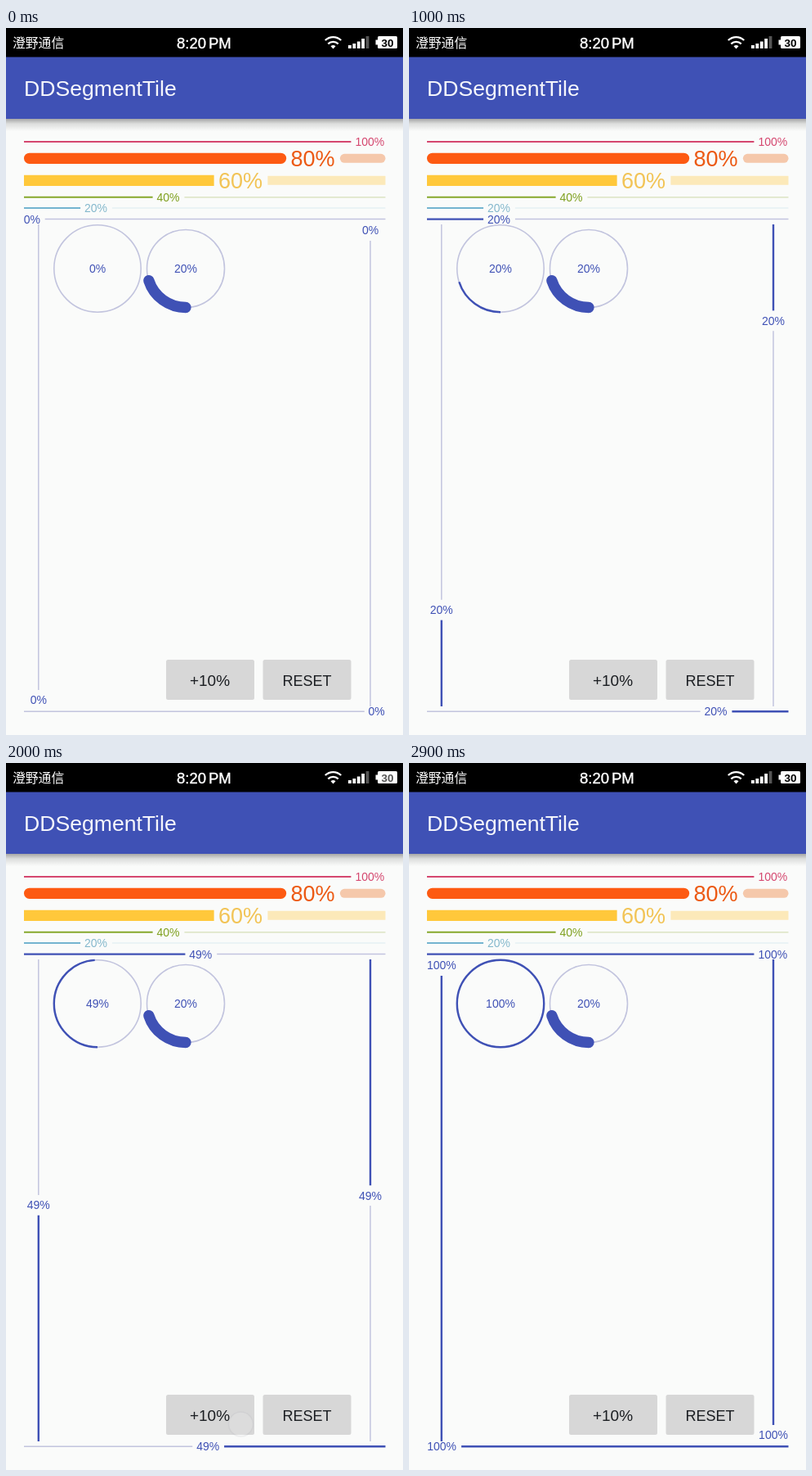
An HTML page for the animation above (3.9 s loop, 486x864 px).

```html
<!DOCTYPE html>
<html>
<head>
<meta charset="utf-8">
<style>
  html, body { margin: 0; width: 100%; height: 100%; overflow: hidden; background: #fafbfa; }
  svg { display: block; width: 486px; height: 864px; font-family: "Liberation Sans", Arial, sans-serif; }
  .arc { fill: none; }
</style>
</head>
<body>
<svg viewBox="0 0 486 864">
  <defs>
    <linearGradient id="shade" x2="0" y2="1">
      <stop offset="0" stop-opacity=".34"/>
      <stop offset=".4" stop-opacity=".12"/>
      <stop offset="1" stop-opacity="0"/>
    </linearGradient>
  </defs>
  <rect width="486" height="864" fill="#fafbfa"/>
  <rect y="111" width="486" height="15" fill="url(#shade)"/>
  <rect y="35" width="486" height="76" fill="#3f51b5"/>
  <rect width="486" height="35.5"/>
  <text x="22" y="83" font-size="26.6" fill="#f6f7fc">DDSegmentTile</text>
  <g fill="#fff">
    <text x="8" y="23.5" font-size="15.8" font-weight="500" style="font-family:'Noto Sans CJK SC','Noto Sans CJK',sans-serif">澄野通信</text>
    <g font-size="18.5" stroke="#fff" stroke-width=".4">
      <text x="209" y="24.5">8:20</text>
      <text x="248" y="24.5">PM</text>
    </g>
    <g id="signal"></g>
    <path d="M400.5 25.5l-3-3.2a4.4 4.4 0 0 1 6 0z"/>
    <path class="arc" stroke="#fff" stroke-width="2.3" d="M394.3 19.4a9 9 0 0 1 12.4 0M390.8 15a14 14 0 0 1 19.4 0"/>
    <rect x="455" y="10" width="24" height="15" rx="1.5"/>
    <rect x="452.5" y="14.5" width="2.5" height="6"/>
    <text id="charge" x="467" y="22.5" font-size="13.5" font-weight="bold" text-anchor="middle">30</text>
  </g>
  <g id="fixed"></g>
  <g id="live"></g>
  <rect id="plus" x="196" y="772" width="108" height="49" rx="2.5"/>
  <rect x="314.5" y="772" width="108" height="49" rx="2.5" fill="#d7d7d7"/>
  <g fill="#1b1e22" text-anchor="middle">
    <text x="249.5" y="804" font-size="19">+10%</text>
    <text x="368.5" y="804" font-size="18">RESET</text>
  </g>
  <circle id="touch" cx="287.5" cy="808" r="15" fill="#f0f0f2" stroke-width="1.6"/>
</svg>
<script>
const $ = id => document.getElementById(id);
const LOOP = 3900, STEP = 100, RISE = 225, HOLD = 60, FADE = 250;
const taps = [350, 750, 1200, 1500, 1800, 2070, 2150, 2270, 2410, 2550];
const BLUE = '#3f51b5', PALE = '#c2c4de';
const clamp = (v, lo, hi) => Math.min(hi, Math.max(lo, v));

const label = (x, y, p, color, size = 14) =>
  `<text x="${x}" y="${y + size * .355}" font-size="${size}" fill="${color}" text-anchor="middle">${p}%</text>`;

// A line from (x, y) along (dx, dy), split by its label
function bar(x, y, dx, dy, p, o = {}) {
  const { color = BLUE, rest = PALE, text = color, w = 2.4, rw = 1.5, size = 14, round = false } = o;
  const len = dx ? 442.5 : 589;
  const half = dx ? (8.2 * String(p).length + 12.6) / 2 * size / 14 : 7.5;
  const mid = clamp(p / 100 * len, half, len - half), gap = half + 4.9;
  const line = (a, b, stroke, width) => {
    if (b - a < 1) return '';
    if (round) { a += width / 2; b -= width / 2; }
    return `<path d="M${x + dx * a} ${y + dy * a}L${x + dx * b} ${y + dy * b}" stroke="${stroke}"
      stroke-width="${width}" stroke-linecap="${round ? 'round' : 'butt'}"/>`;
  };
  const lx = x + dx * mid - (dx ? .5 : 0);
  return line(0, mid - gap, color, w) + line(mid + gap, len, rest, rw) + label(lx, y + dy * mid, p, text, size);
}

function ring(x, y, r, p, w) {
  return `<circle class="arc" cx="${x}" cy="${y}" r="${r}" stroke="${PALE}" stroke-width="1.6"/>` +
    (p ? `<circle class="arc" cx="${x}" cy="${y}" r="${r}" stroke="${BLUE}" stroke-width="${w}" pathLength="100"
      stroke-dasharray="${p} ${p < 100 ? 200 : 0}" stroke-linecap="${w > 5 ? 'round' : 'butt'}"
      transform="rotate(90 ${x} ${y})"/>` : '') + label(x, y, p, BLUE);
}

$('signal').innerHTML = [4, 6, 8.5, 12, 15].map((h, i) =>
  `<rect x="${419 + i * 5.4}" y="${25 - h}" width="3.8" height="${h}" fill="${i < 4 ? '#fff' : '#555'}"/>`).join('');

$('fixed').innerHTML =
  bar(22, 139, 1, 0, 100, { color: '#d5476f', w: 2 }) +
  bar(22, 159.3, 1, 0, 80, { color: '#fd5a12', rest: '#f5c8ab', text: '#ec5a14', w: 13.3, rw: 11, size: 27, round: true }) +
  bar(22, 186.3, 1, 0, 60, { color: '#ffc83b', rest: '#fce9b9', text: '#f2c456', w: 13.3, rw: 11, size: 27 }) +
  bar(22, 206.8, 1, 0, 40, { color: '#86a92c', rest: '#d6dfb8', text: '#7fa01e', w: 2, rw: 1.2 }) +
  bar(22, 220, 1, 0, 20, { color: '#74b4d0', rest: '#dcebf1', text: '#84b8cc', w: 2, rw: 1.2 }) +
  ring(220, 294, 47.5, 20, 13.3);

function draw(t) {
  const p = Math.round(taps.reduce((sum, c) => sum + 10 * clamp((t - c) / RISE, 0, 1), 0));
  $('live').innerHTML =
    bar(22, 233.6, 1, 0, p) +
    bar(464.5, 835.3, -1, 0, p) +
    bar(39.8, 829, 0, -1, p) +
    bar(446, 240, 0, 1, p) +
    ring(112, 294, 53.2, p, 2.4);

  const pressed = taps.some(c => t >= c - HOLD && t <= c);
  const glow = Math.max(0, ...taps.map(c => t > c ? 1 - (t - c) / FADE : 0));
  $('plus').setAttribute('fill', pressed ? '#bababa' : '#d7d7d7');
  $('touch').setAttribute('opacity', pressed ? 1 : glow);
  $('touch').setAttribute('stroke', pressed ? '#a3add6' : '#b9b9c0');
  $('charge').setAttribute('fill', t >= 1200 && t < 2400 ? '#555' : '#000');
}

let last = -1;
const start = performance.now();
function tick(now) {
  const t = Math.floor(Math.max(0, now - start) % LOOP / STEP) * STEP;
  if (t !== last) draw(last = t);
  requestAnimationFrame(tick);
}
draw(0);
requestAnimationFrame(tick);
</script>
</body>
</html>
```
